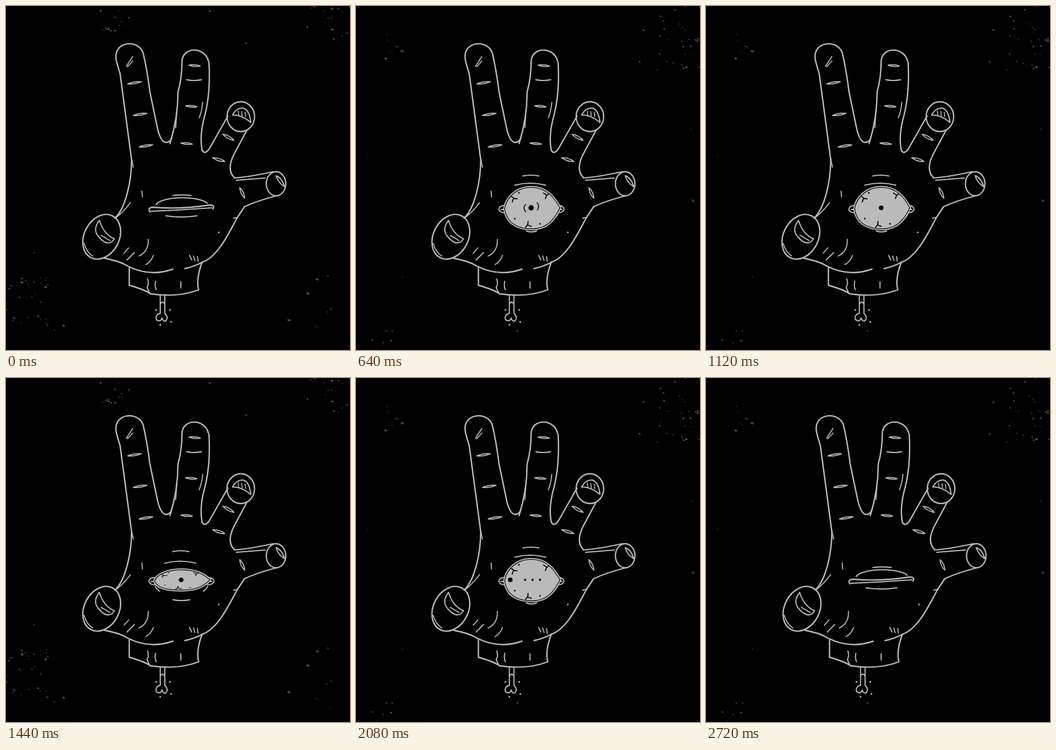
An HTML page with a canvas that plays this animation: 600x600 px, repeating every 2800 ms.

```html
<!DOCTYPE html>
<html lang="en">
<head>
<meta charset="utf-8">
<title>Hand with an eye</title>
<style>
  html, body { margin: 0; width: 100%; height: 100%; overflow: hidden; background: #000; }
  canvas { display: block; width: 600px; height: 600px; filter: url(#rough); }
  svg { position: absolute; width: 0; height: 0; }
</style>
</head>
<body>
<svg aria-hidden="true">
  <filter id="rough" x="0" y="0" width="1" height="1" color-interpolation-filters="sRGB">
    <feTurbulence type="fractalNoise" baseFrequency=".08" numOctaves="1" seed="4"/>
    <feDisplacementMap in="SourceGraphic" scale="1.6" xChannelSelector="R" yChannelSelector="G"/>
  </filter>
</svg>
<canvas id="stage" width="600" height="600"></canvas>
<script>
const ctx = document.getElementById('stage').getContext('2d');
const INK = '#bababa', BLACK = '#000';
const STEP = 80, STEPS = 35;
const EYE_X = 306, EYE_Y = 352;

function stroke(path, width = 2, color = INK) {
  ctx.lineWidth = width;
  ctx.strokeStyle = color;
  ctx.stroke(typeof path === 'string' ? new Path2D(path) : path);
}

function oval(x, y, rx, ry, turn = 0) {
  const path = new Path2D();
  path.ellipse(x, y, rx, ry, turn, 0, Math.PI * 2);
  return path;
}

function dot(x, y, r, color = INK) {
  ctx.fillStyle = color;
  ctx.fill(oval(x, y, r, r));
}

// Shallow arc around a centre; a negative rise sags
function arc(x, y, half, rise) {
  stroke(`M${x - half} ${y + rise}Q${x} ${y - rise} ${x + half} ${y + rise}`, 2);
}

// Leaf-shaped skin fold
function fold(x, y, half, angle, bulge = 3) {
  ctx.save();
  ctx.translate(x, y);
  ctx.rotate(angle);
  stroke(`M${-half} 0Q0 ${-bulge} ${half} 0Q0 ${bulge} ${-half} 0`, 1.8);
  ctx.restore();
}

function drawFingers() {
  // index
  stroke(`M190 370C209 352 219 305 219 268L199 118C192 96 190 88 193 80
    C200 61 231 61 239 81Q246 110 251 150L265 217Q271 238 279 238Q286 238 289 230`, 2.4);
  // middle
  stroke('M286 240Q300 195 300 150Q307 125 307 96C309 70 347 71 353 96', 2.4);
  stroke('M354 98Q357 150 347 190Q337 225 342 251Q346 260 354 250L387 192', 2.4);
  // ring
  stroke(oval(409.5, 193, 24, 26), 2.3);
  stroke('M420 217L398 258Q384 285 398 299', 2.4);
  // little finger
  stroke(oval(471, 310, 17, 21), 2.3);
  stroke('M398 300Q425 298 466 289M402 304L452 300M472 331Q440 339 416 350', 2.2);
  // thumb
  stroke(oval(167, 402.5, 30.5, 41, .48), 2.4);
  stroke('M136 414Q141 430 151 436', 1.8);

  for (let i = 0; i < 3; i++) fold(224 + 10 * i, 134 + 55 * i, 12, -.16);
  for (let i = 0; i < 3; i++) fold(329 - 5 * i - i * i, 104 + 74 * i - 3 * i * i, 10, .08);
  for (let i = 0; i < 2; i++) fold(388 - 17 * i, 229 + 39 * i, 11, .5 - .2 * i, 4);
  fold(412, 326, 10, 1.13, 4);
  arc(328, 130, 13, -1.5);
  stroke('M221 88L210 105M221 96L212 106M343 168Q342 182 337 195M298 184L296 212', 1.8);

  // nails
  stroke('M163 374Q150 390 162 403Q175 418 185 411L189 406Q170 398 163 374M166 400L181 409', 2);
  stroke('M395 190Q402 177 414 178Q425 182 427 203Q412 190 395 190', 2);
  for (let i = 0; i < 3; i++) stroke(`M${405 + 6 * i} ${183 + i}l1 8`, 1.6);
  stroke('M471 296Q481 299 486 315Q475 309 471 296', 2);
}

function drawPalm() {
  stroke('M416 350L404 368C390 393 370 438 342 447M342 447Q330 454 312 458', 2.4);
  stroke('M291 459C260 470 235 465 213 454C200 446 190 444 172 440', 2.4);
  stroke('M191 370Q206 358 217 343M219 266L222 281M397 370l6 -1M237 323l1 10', 1.8);
  stroke('M248 407Q249 428 232 436M214 422L206 431M224 430L211 443M257 435Q253 446 244 451', 1.8);
  for (let i = 0; i < 3; i++) stroke(`M${320 + 7 * i} ${435 + i}l${4 - 1.5 * i} 8`, 1.8);
  dot(371, 395, 1.4);
}

function drawWrist() {
  stroke('M215 457V487Q245 496 252 502Q300 509 336 495Q331 477 342 447', 2.4);
  stroke('M247 476Q250 485 246 491L250 500M261 480Q259 488 262 495M305 481V492', 1.9);
  stroke(`M269 504V536C260 538 259 549 267 549Q272 548 272 544Q274 551 279 549
    Q284 543 277 536V504M269 520Q273 513 277 520`, 2);
  for (const side of [-1, 1]) {
    dot(274 + 12 * side, 530, 1.6);
    dot(278.5 + 9.5 * side, 553.5 - 2.5 * side, 1.5);
  }
}

// Dust clusters: centre, spread, count
const cluster = (x, y, spread, count) => ({ x, y, spread, count });
const dustSets = [
  [cluster(195, 18, 30, 14), cluster(565, 22, 38, 18), cluster(30, 512, 48, 32),
    cluster(540, 525, 55, 8), cluster(300, 300, 300, 22)],
  [cluster(568, 30, 38, 20), cluster(562, 95, 38, 16), cluster(65, 75, 30, 9),
    cluster(40, 585, 30, 6), cluster(300, 300, 300, 24)]
];

function makeDust(clusters, seed) {
  const rnd = () => (seed = seed * 16807 % 2147483647) / 2147483647;
  const spots = [];
  for (const { x, y, spread, count } of clusters)
    for (let i = 0; i < count; i++) {
      const spot = {
        x: x + (rnd() * 2 - 1) * spread, y: y + (rnd() * 2 - 1) * spread,
        r: .7 + rnd() * rnd() * 2, shade: 45 + rnd() * 45 | 0
      };
      if (Math.hypot(spot.x - 305, spot.y - 310) > 255) spots.push(spot);
    }
  return spots;
}
const dust = dustSets.map((set, i) => makeDust(set, 71 + 452 * i));

function drawDust(spots) {
  for (const { x, y, r, shade } of spots) {
    ctx.fillStyle = `rgb(${shade},${shade},${shade})`;
    ctx.fill(oval(x, y, r * 1.4, r * .9, .3));
  }
}

function almond(open) {
  const top = EYE_Y - 35 * open, low = EYE_Y + 36 * open;
  return new Path2D(`M260 354C262 ${354 - 18 * open} 280 ${top} 305 ${top}
    C333 ${top} 345 ${352 - 17 * open} 355 352C346 ${352 + 18 * open} 334 ${low} 307 ${low}
    C279 ${low} 263 ${354 + 22 * open} 260 354`);
}

function drawClosedEye() {
  stroke('M262 346C274 331 338 331 351 344', 2.2);
  stroke('M251 359Q246 352 256 351Q305 355 356 347Q365 348 361 354', 2.3);
  stroke('M253 358Q305 356 359 352', 2);
  arc(307, 329.5, 16, 1);
  arc(306, 368, 27, -2);
}

function drawLids(open) {
  const mix = (a, b) => a + (b - a) * open;
  arc(304, mix(329, 309), 27, 3.5);
  arc(305, mix(307, 295), 14, 1.5);
  arc(306, mix(383, 394), mix(20, 9), -1.5);
  for (const side of [-1, 1]) {
    const x = d => EYE_X + side * d;
    stroke(`M${x(45)} 348Q${x(56)} 347 ${x(57)} 355Q${x(53)} 362 ${x(45)} 360M${x(53)} 355H${x(48)}`, 2);
    stroke(`M${x(46)} 363Q${x(43)} 369 ${x(38)} 372`, 1.7);
  }
}

function drawVein(x, y, angle) {
  ctx.save();
  ctx.translate(x, y);
  ctx.rotate(angle);
  stroke('M0 0L6 1L11 -1M5 1L6 8', 1.8, BLACK);
  ctx.restore();
}

function drawPupil({ x, r, rings, trail }) {
  dot(x, EYE_Y, r, BLACK);
  if (rings) stroke('M296 346Q290 352 296 359M316 343Q321 350 316 356', 1.5, BLACK);
  if (trail) for (let i = 2; i < 5; i++) dot(x + 13 * i, EYE_Y, 1.9, BLACK);
}

function drawTear(fall) {
  const y = 376 + fall;
  stroke(`M344 373V${y}Q343 ${y + 8} 347 ${y + 6}Q349 ${y} 346 ${y - 4}`, 1.7);
  for (const side of [-1, 1])
    for (const a of [-.3, -.55, -.9]) {
      const reach = 54 + 12 * Math.cos(a);
      dot(EYE_X + side * reach * Math.cos(a), EYE_Y + reach * Math.sin(a), 1.3);
    }
}

function drawEye(pose) {
  const { open } = pose;
  if (!open) return drawClosedEye();
  const shape = almond(open);
  drawLids(open);
  stroke(shape, 6.5);
  stroke(shape, 2.4, BLACK);
  ctx.fillStyle = INK;
  ctx.fill(shape);
  ctx.save();
  ctx.clip(shape);
  ctx.save();
  ctx.translate(0, EYE_Y * (1 - open));
  ctx.scale(1, open);
  drawVein(271, 332, .5);
  drawVein(337, 327, 2.3);
  drawVein(296, 386, -1.1);
  for (const [x, y] of [[284, 326], [277, 371], [321, 380]]) dot(x, y, 1.4, BLACK);
  ctx.restore();
  drawPupil(pose);
  ctx.restore();
  if (pose.tear) drawTear(pose.tear);
}

const shutAt = [0, 19, 34];

function poseAt(step) {
  const fromShut = Math.min(...shutAt.map(s => Math.abs(step - s)));
  const within = (a, b) => step >= a && step <= b;
  return {
    open: Math.min(1, .48 * fromShut),
    r: Math.max(4, 15.5 - 3.6 * Math.max(0, step - 5)),
    x: within(23, 25) ? 342 : within(26, 30) ? 269 : 305.5,
    rings: within(7, 8),
    trail: step === 26,
    tear: within(3, 6) && 8 * (step - 3)
  };
}

function draw(step) {
  const boil = step % 3;
  ctx.fillStyle = BLACK;
  ctx.fillRect(0, 0, 600, 600);
  ctx.lineCap = ctx.lineJoin = 'round';
  drawDust(dust[Math.sign(boil)]);
  ctx.save();
  ctx.translate([0, .5, -1.5][boil], 0);
  drawFingers();
  drawPalm();
  drawWrist();
  ctx.restore();
  drawEye(poseAt(step));
}

const start = performance.now();
let last = -1;
function tick() {
  const step = Math.floor((performance.now() - start) / STEP) % STEPS;
  if (step !== last) draw(last = step);
  requestAnimationFrame(tick);
}
tick();
</script>
</body>
</html>
```
